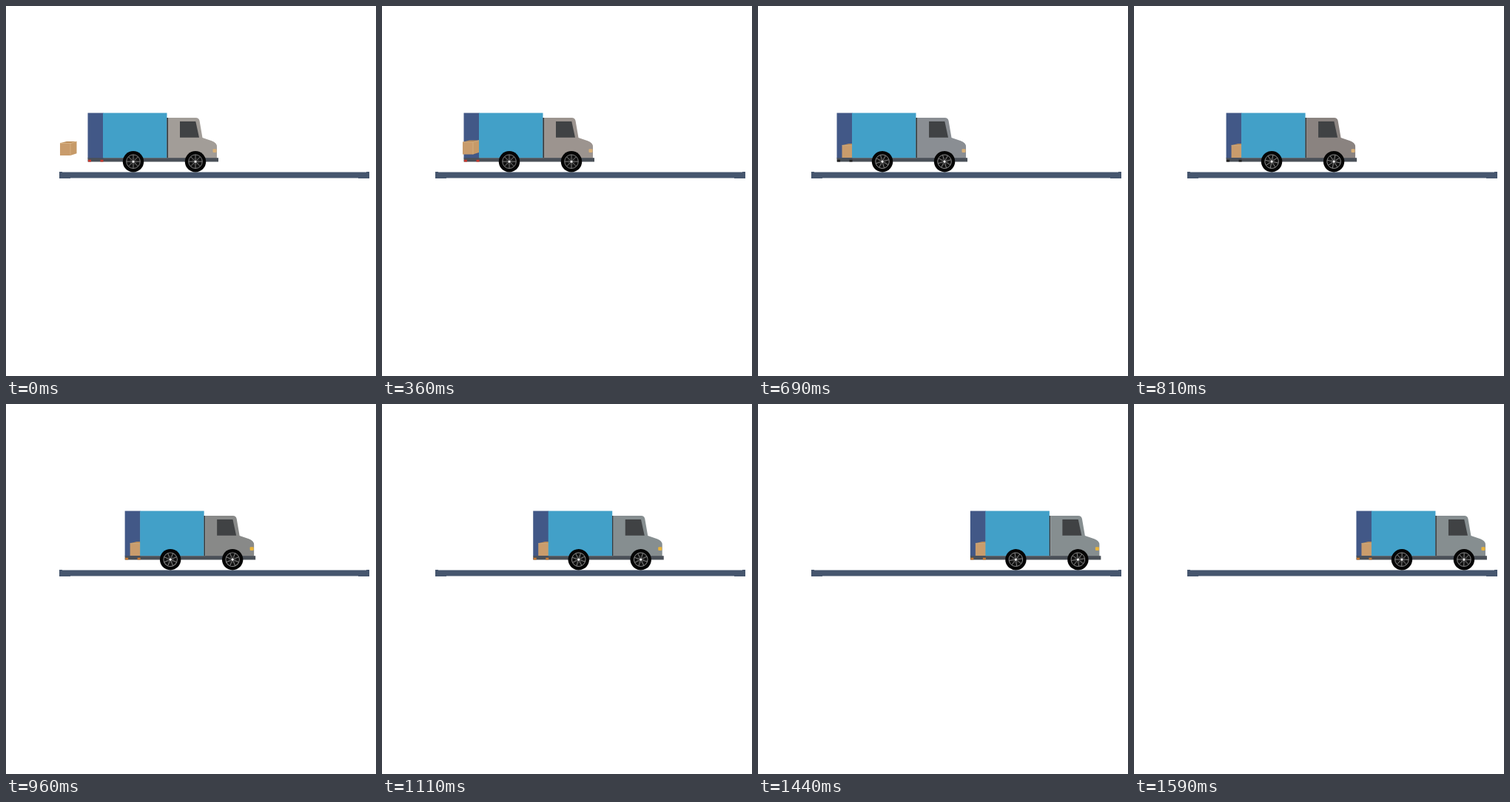
Write an HTML page that moves like this. It is 500 px wide and 500 px high and loops after 1680 ms.

```html
<!DOCTYPE html>
<html lang="en">
<head>
<meta charset="utf-8">
<title>Delivery truck</title>
<style>
html, body { margin: 0; width: 100%; height: 100%; overflow: hidden; background: #fff; }
svg { display: block; width: 100%; height: 100%; }
</style>
</head>
<body>
<svg viewBox="0 0 500 500">
  <defs>
    <g id="wheel">
      <circle r="14.2" fill="#050505"/>
      <circle r="9.3" fill="#111" stroke="#8c8c8c" stroke-width=".9"/>
      <path d="M0-9V9M-9 0H9M-6.4-6.4 6.4 6.4M-6.4 6.4 6.4-6.4" stroke="#999" stroke-width=".8"/>
      <circle r="4" fill="none" stroke="#444" stroke-width=".8"/>
      <circle r="1.5" fill="#eee"/>
    </g>
  </defs>
  <path d="M72 224H76V224.5H487V224H491V233H476V232.6H87V233H72Z" fill="#46566e"/>
  <g id="truck">
    <path d="M110.5 144.5H131.5V206H110.5Z" fill="#425887"/>
    <g id="box">
      <path d="M73 185.3 82 183H95.5L87 185.6Z" fill="#bd8f5c"/>
      <path d="M73 185.3 87 185.6V202H73Z" fill="#c99c6c"/>
      <path d="M87 185.6 95.5 183V199.3L87 202Z" fill="#c69a68"/>
      <path d="M73 185.3 87 185.6V202M87 185.6 95.5 183" fill="none" stroke="#dcb887" stroke-width=".7"/>
    </g>
    <path d="M131 144.5H217.5V205.5H131Z" fill="#42a0c8"/>
    <path d="M217.3 151H219V205.5H217.3Z" fill="#33383c"/>
    <path id="cab" d="M219 151H256.5Q260.5 151 261.5 155L265.5 178 278 182.3Q285 185 285 190V206H219Z"/>
    <path d="M235 156H256.3L261 177.7H235Z" fill="#404244"/>
    <rect id="headlight" x="279.5" y="193.3" width="5" height="4.6" rx="1"/>
    <path d="M110.5 205.2H287V210.4H110.5Z" fill="#4a5058"/>
    <path id="lamps" d="M111 207.8H115V210.4H111ZM127.5 207.8H131.5V210.4H127.5Z"/>
    <g transform="translate(172 210.2)"><use href="#wheel" class="spin"/></g>
    <g transform="translate(256 210.2)"><use href="#wheel" class="spin"/></g>
  </g>
</svg>
<script>
const LOOP = 1680, STEP = 30, LAST = 1590, WHEEL_RADIUS = 14.2;
const [truck, box, cab, headlight, lamps] =
  ['truck', 'box', 'cab', 'headlight', 'lamps'].map(id => document.getElementById(id));
const wheels = document.querySelectorAll('.spin');

// [time, r, g, b]
const cabTones = [
  [0, 162, 157, 152], [360, 156, 148, 143], [570, 137, 153, 166],
  [810, 138, 131, 128], [1110, 134, 142, 144], [1680, 134, 142, 144]
];

function ease(t, start, end) {
  const u = Math.min(1, Math.max(0, (t - start) / (end - start)));
  return u * u * (3 - 2 * u);
}

function cabColour(t) {
  const i = cabTones.findIndex(tone => tone[0] > t);
  const a = cabTones[i - 1], b = cabTones[i];
  const u = (t - a[0]) / (b[0] - a[0]);
  return `rgb(${[1, 2, 3].map(k => Math.round(a[k] + (b[k] - a[k]) * u))})`;
}

function draw(t) {
  // The truck rolls back a little before driving off.
  const x = -8.5 * ease(t, 450, 600) + 198.5 * ease(t, 600, 1600);
  const load = ease(t, 0, 500);
  const boxY = 3 * load - 25.6 * load * (1 - load);

  truck.setAttribute('transform', `translate(${x} 0)`);
  box.setAttribute('transform', `translate(${44.5 * load} ${boxY})`);
  const angle = x / WHEEL_RADIUS * 180 / Math.PI;
  wheels.forEach(w => w.setAttribute('transform', `rotate(${angle})`));

  cab.setAttribute('fill', cabColour(t));
  headlight.setAttribute('fill', t < 960 ? '#d8b078' : '#e8b33c');
  lamps.setAttribute('fill', t < 690 ? '#c8372d' : t < 960 ? '#222' : '#c87a34');
}

function tick() {
  const t = performance.now() % LOOP;
  draw(Math.min(LAST, Math.floor(t / STEP) * STEP));
  requestAnimationFrame(tick);
}
tick();
</script>
</body>
</html>
```
